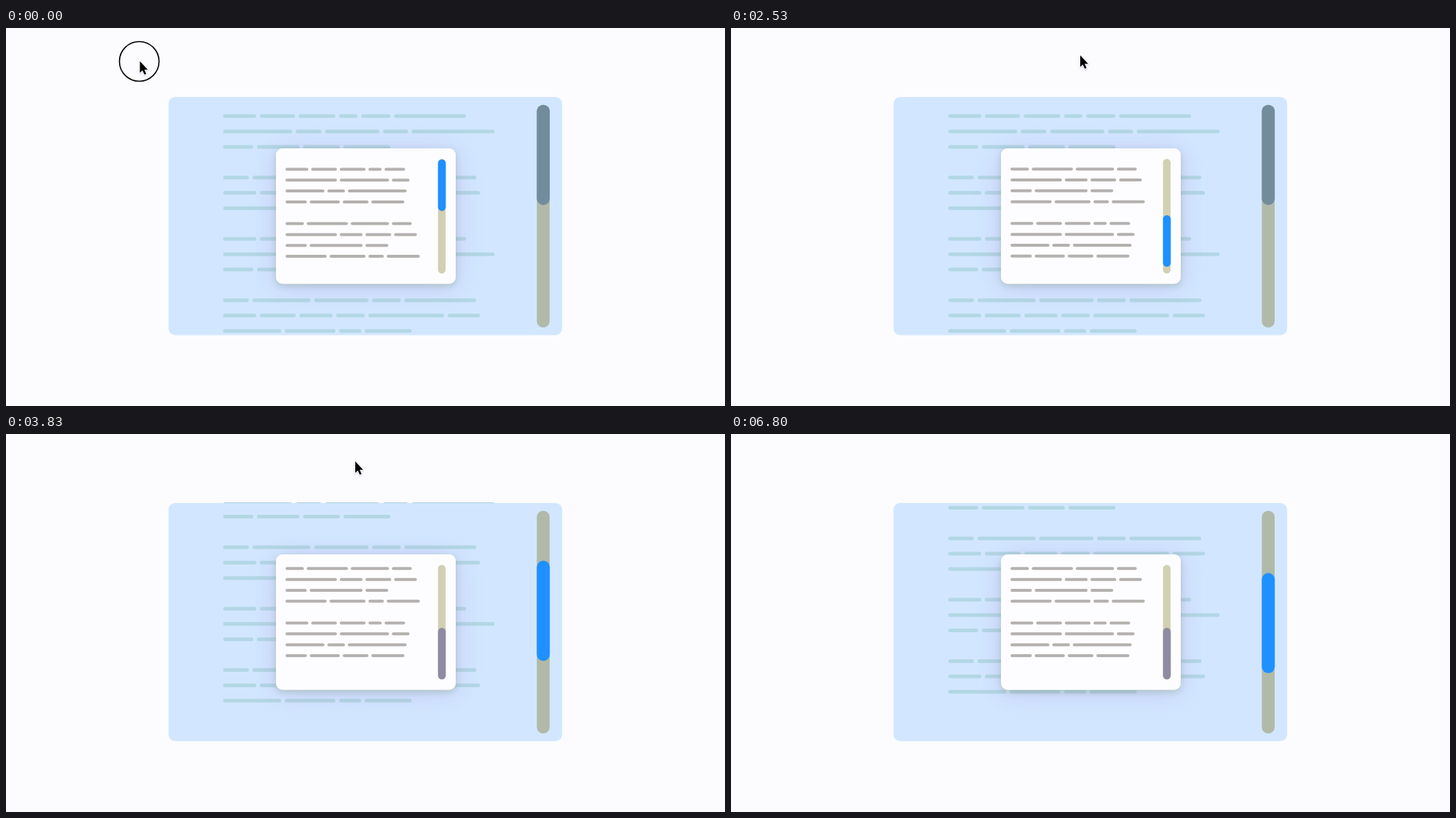
Write an HTML page with a canvas that moves like this. It is 980x515 px and loops after 6.83 s.

```html
<!DOCTYPE html>
<html lang="en">
<head>
<meta charset="utf-8">
<title>Nested scrolling</title>
<style>
  html, body { margin: 0; width: 100%; height: 100%; overflow: hidden; background: #fcfcff; }
  canvas { display: block; width: 980px; height: 515px; }
</style>
</head>
<body>
<canvas id="stage" width="980" height="515"></canvas>
<script>
const ctx = document.getElementById('stage').getContext('2d');
const LOOP = 6830;
const BLUE = '#1f90ff';

// Dash widths per line; an empty line separates paragraphs.
const pageA = [[45, 48, 50, 25, 40, 98], [94, 35, 74, 34, 113], [41, 58, 50, 64], []];
const pageB = [[35, 79, 74, 39, 98], [45, 49, 45, 39, 103, 44], [79, 69, 30, 64], []];
const pageLines = [...pageA, ...pageB, ...pageA, ...pageB];

const cardA = [[31, 35, 35, 18, 28], [70, 67, 24], [53, 24, 80], [29, 41, 35, 45]];
const cardB = [[25, 56, 52, 27], [70, 31, 35, 31], [29, 72, 31], [56, 49, 21, 45]];
const cardLines = [...cardA, [], ...cardB, [], ...cardA];

const clamp = v => Math.min(1, Math.max(0, v));
const span = (t, from, to) => clamp((t - from) / (to - from));
const sine = p => (1 - Math.cos(Math.PI * p)) / 2;
const mix = (a, b, p) => a + (b - a) * p;

function box(x, y, w, h, r, color) {
  ctx.fillStyle = color;
  ctx.beginPath();
  ctx.roundRect(x, y, w, h, r);
  ctx.fill();
}

function clipped(x, y, w, h, r, paint) {
  ctx.save();
  ctx.beginPath();
  ctx.roundRect(x, y, w, h, r);
  ctx.clip();
  paint();
  ctx.restore();
}

function shadow(color, blur, drop) {
  ctx.shadowColor = color;
  ctx.shadowBlur = blur;
  ctx.shadowOffsetY = drop;
}

function dashes(widths, x, y, gap, thick, color) {
  for (const w of widths) {
    box(x, y - thick / 2, w, thick, thick / 2, color);
    x += w + gap;
  }
}

function page(scroll, active) {
  box(221.5, 94, 536.5, 324.5, 9, '#d2e7ff');
  clipped(221.5, 93, 536.5, 325.5, 9, () => {
    pageLines.forEach((line, i) =>
      dashes(line, 296, 120.1 + 20.9 * i - 61.5 * scroll, 5, 5, '#b3d7e4'));
  });
  box(723.5, 104.5, 17.5, 303.5, 8.75, '#b1baa9');
  box(723.5, 104.7 + 84.6 * scroll, 17.7, 136.5, 8.85, active ? BLUE : '#738c9c');
}

function card(scroll, active) {
  ctx.save();
  shadow('rgba(150, 105, 200, 0.24)', 36, 4);
  box(368, 164, 245, 184.5, 9, '#fdfdff');
  shadow('rgba(110, 150, 90, 0.3)', 8, 3);
  box(368, 164, 245, 184.5, 9, '#fdfdff');
  ctx.restore();

  clipped(376, 178, 205, 152, 0, () => {
    cardLines.forEach((line, i) => {
      ctx.globalAlpha = i < 4 ? clamp(1 - scroll * 7) : 1;
      dashes(line, 381, 192.4 + 14.83 * i - 83.2 * scroll, 4, 4, '#b4b1ae');
    });
  });
  box(588.8, 178.2, 10.4, 156.2, 5.2, '#d2d0b3');
  box(588.8, 179 + 85 * scroll, 10.6, 70.3, 5.3, active ? BLUE : '#8f8ca1');
}

function ring(t, start, length, size, x, y) {
  const p = (t - start) / length;
  if (p < 0 || p >= 1) return;
  ctx.globalAlpha = clamp((1 - p) * 2.5);
  ctx.strokeStyle = '#000';
  ctx.lineWidth = 1.6;
  ctx.beginPath();
  ctx.arc(x, y, mix(size, 6, sine(p)), 0, 2 * Math.PI);
  ctx.stroke();
  ctx.globalAlpha = 1;
}

function pointer(x, y) {
  const shape = new Path2D('M0 0V15.6L3.5 12.4L6.2 18.2L8.6 17.2L6.1 11.5H10.8Z');
  ctx.save();
  ctx.translate(x, y);
  ctx.lineJoin = 'round';
  shadow('rgba(70, 50, 140, 0.25)', 2, 1);
  ctx.strokeStyle = '#fff';
  ctx.lineWidth = 2;
  ctx.stroke(shape);
  ctx.shadowColor = 'transparent';
  ctx.fillStyle = '#000';
  ctx.fill(shape);
  ctx.restore();
}

function pointerAt(t) {
  const enter = sine(span(t, 40, 720));
  const settle = sine(span(t, 720, 960));
  const leave = span(t, 5700, 6200) ** 2;
  return {
    x: mix(182.5, 482, enter) - 6 * settle,
    y: mix(45.3, 37.9, enter) - 0.6 * settle - 70 * leave
  };
}

function draw(t) {
  ctx.fillStyle = '#fcfcff';
  ctx.fillRect(0, 0, 980, 515);

  const outer = t >= 3300;
  page(sine(span(t, 3407, 4007)), outer);
  card(sine(span(t, 2058, 2658)), !outer);

  const { x, y } = pointerAt(t);
  ring(t, 0, 280, 27, x - 0.9, y + 0.2);
  ring(t, 1500, 400, 30, x, y);
  ring(t, 3000, 320, 27, x, y);
  if (t < 6200) pointer(x, y);
}

const start = performance.now();
function tick() {
  draw((performance.now() - start) % LOOP);
  requestAnimationFrame(tick);
}
tick();
</script>
</body>
</html>
```
